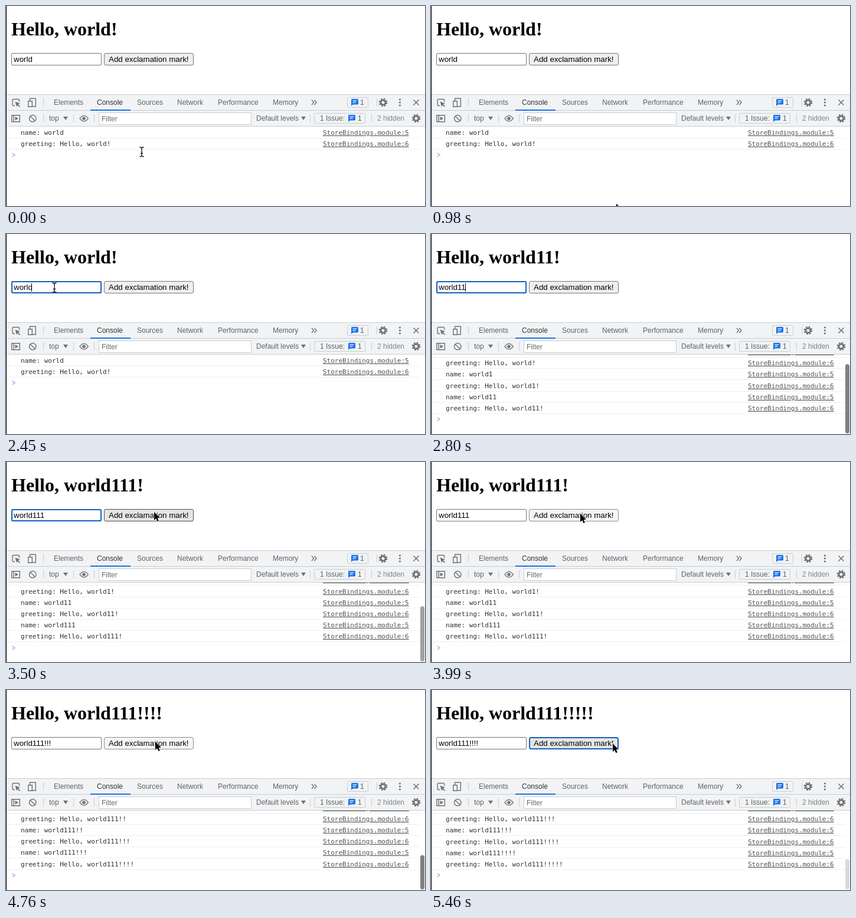
Write an HTML page that moves like this. It is 710 by 340 pixels and loops after 5.53 s.

```html
<!DOCTYPE html>
<html lang="en">
<head>
<meta charset="utf-8">
<title>Store bindings</title>
<style>
  html, body { margin: 0; width: 100%; height: 100%; overflow: hidden; background: #fff; }
  svg { display: block; }
  text { font: 12px "Liberation Sans", Arial, sans-serif; fill: #5f6368; white-space: pre; }
  #heading { font: bold 32px "Liberation Serif", Times, serif; fill: #000; }
  .form { font-size: 13.333px; fill: #000; }
  .log text { font: 11px "DejaVu Sans Mono", Menlo, monospace; fill: #303030; }
  .log .link { fill: #545454; text-decoration: underline; }
  .icon { fill: none; stroke: #6e7175; stroke-width: 1.4; }
  .solid { fill: #6e7175; }
  .rule { fill: none; stroke: #cacdd1; }
</style>
</head>
<body>
<svg width="710" height="340" viewBox="0 0 710 340">
  <defs>
    <clipPath id="pane"><path d="M1 205H710V340H1Z"/></clipPath>
    <g id="gear">
      <circle r="3.9" class="icon" style="stroke-width:2.8"/>
      <circle r="6" class="icon" style="stroke-width:2.6" stroke-dasharray="2.6 2.112"/>
    </g>
    <g id="chat">
      <path d="M1.5 0H10.5Q12 0 12 1.5V8Q12 9.5 10.5 9.5H3L0 12V1.5Q0 0 1.5 0Z" fill="#1a73e8"/>
      <path d="M2.5 3.2H9.5M2.5 6.2H7.5" stroke="#fff" stroke-width="1.3"/>
    </g>
    <path id="down" class="solid" d="M0 0H8L4 6Z"/>
  </defs>

  <text id="heading" x="9" y="50"></text>
  <rect id="field" rx="1.5" fill="#fff"/>
  <text id="value" class="form" x="13" y="95"></text>
  <path id="caret" d="M0 83.5V98" stroke="#000"/>
  <rect id="button" rx="2.5"/>
  <text class="form" x="174" y="95">Add exclamation mark!</text>

  <g clip-path="url(#pane)">
    <g id="log" class="log"></g>
    <path id="prompt" d="M10.5-7L15-4L10.5-1" fill="none" stroke="#8fb4f3" stroke-width="1.5"/>
    <path id="promptCaret" d="M26.5 247V260" stroke="#000"/>
    <rect id="thumb" x="702" width="7" rx="3.5" fill="#808080"/>
  </g>

  <path d="M1 150H710V205H1Z" fill="#f1f3f4"/>
  <path class="rule" d="M1 150.5H710M1 177.5H710M1 204.5H710M63.5 157V171M628.5 157V171M63.5 184V198M114.5 184V198M149.5 184V198M515.5 184V198M619.5 184V198"/>
  <path d="M143 176H211V178H143Z" fill="#1a73e8"/>
  <g id="labels"></g>

  <!-- upper toolbar -->
  <path class="icon" d="M15 169.5H12.5Q11 169.5 11 168V160Q11 158.5 12.5 158.5H21Q22.5 158.5 22.5 160V163"/>
  <path class="solid" d="M15.5 162.5L24 165.7L20.7 167.2L24 170.5L22.7 171.8L19.4 168.5L18 171.5Z"/>
  <path class="icon" d="M40.5 161V157.2H50.3V170.8H45M37.7 161.7H44.3V171.3H37.7Z"/>
  <path class="icon" d="M518 160L521.5 164L518 168M522.5 160L526 164L522.5 168"/>
  <rect class="rule" x="578.5" y="155.5" width="35" height="17" rx="2"/>
  <use href="#chat" x="585" y="158"/>
  <use href="#gear" x="639" y="164"/>
  <g class="solid"><circle cx="667.5" cy="159" r="1.6"/><circle cx="667.5" cy="164" r="1.6"/><circle cx="667.5" cy="169" r="1.6"/></g>
  <path class="icon" d="M690.5 159.5L699.5 168.5M699.5 159.5L690.5 168.5" style="stroke-width:1.6"/>

  <!-- lower toolbar -->
  <path class="icon" d="M9.7 185.7H23.3V196.8H9.7ZM13 185.7V196.8"/>
  <path class="solid" d="M15.5 188L21 191.2L15.5 194.5Z"/>
  <path class="icon" d="M39.5 191.2a5.7 5.7 0 1 0 11.4 0a5.7 5.7 0 1 0-11.4 0M41.2 187.2L49.2 195.2"/>
  <use href="#down" x="97" y="188"/>
  <path class="icon" d="M125 191.2Q132 181.5 139.3 191.2Q132 201 125 191.2Z"/>
  <circle class="solid" cx="132" cy="191.2" r="2.7"/>
  <rect x="157.5" y="181.5" width="258" height="20" fill="#fff" stroke="#cacdd1"/>
  <text x="162" y="196" style="fill:#6b6b6b">Filter</text>
  <use href="#down" x="500" y="188"/>
  <rect class="rule" x="522.5" y="182.5" width="86" height="17" rx="2"/>
  <use href="#chat" x="580" y="185"/>
  <use href="#gear" x="695" y="191"/>

  <path d="M0 0H1V340H0Z"/>
  <path id="arrow" d="M0 0V14L3.2 11.1L5.4 16L7.8 15L5.7 10.1H10Z" stroke="#fff" stroke-width="1.2" paint-order="stroke"/>
  <path id="beam" d="M-3.5-8Q0-8 0-5.5Q0-8 3.5-8M0-6V6M-3.5 8Q0 8 0 5.5Q0 8 3.5 8M-2 2.5H2" fill="none" stroke="#111" stroke-width="1.3"/>
</svg>
<script>
const $ = id => document.getElementById(id);
const set = (el, attrs) => { for (const k in attrs) el.setAttribute(k, attrs[k]); };
const show = (el, on) => { el.style.display = on ? '' : 'none'; };

function add(parent, tag, attrs, text = '') {
  const el = document.createElementNS('http://www.w3.org/2000/svg', tag);
  set(el, attrs);
  el.textContent = text;
  return parent.appendChild(el);
}

const LOOP = 5530, STEP = 70, PITCH = 19.2;
const FOCUS = 2030, BLUR = 3990, RING = 5320;
const EDITS = [2520, 2730, 2940, 4130, 4480, 4690, 4830];
const PRESSES = [[BLUR, 4130], [4340, 4480], [4590, 4690], [4760, 4830]];
const VALUES = [...'111!!!!'].reduce((list, c) => [...list, list.at(-1) + c], ['world']);

// time, x, y
const POINTER = [
  [0, 230, 248], [70, 230, 248], [560, 285, 309], [840, 313, 342], [980, 314, 336],
  [1120, 254, 240], [1400, 160, 125], [1680, 118, 76], [1960, 82, 91],
  [3010, 82, 91], [3290, 250, 85], [3500, 251, 85], [3710, 253, 88],
  [5040, 253, 88], [5390, 308, 91], [LOOP, 308, 91]
];

[[81, 'Elements'], [154, 'Console'], [222, 'Sources'], [290, 'Network'],
 [359, 'Performance'], [452, 'Memory'], [600, '1']]
  .forEach(([x, s]) => add($('labels'), 'text', { x, y: 168, style: s === 'Console' ? 'fill:#333' : '' }, s));
[[73, 'top'], [424, 'Default levels'], [532, '1 Issue:'], [596, '1'], [629, '2 hidden']]
  .forEach(([x, s]) => add($('labels'), 'text', { x, y: 195, style: s === '2 hidden' ? 'fill:#80868b' : '' }, s));

const rows = VALUES.flatMap(v => ['name: ' + v, `greeting: Hello, ${v}!`]).map((s, i) => {
  const y = Math.round(219 + PITCH * i), g = add($('log'), 'g', {});
  add(g, 'text', { x: 25, y }, s);
  add(g, 'text', { x: 537, y, class: 'link' }, 'StoreBindings.module:' + (5 + i % 2));
  add(g, 'path', { d: `M1 ${y + 5.5}H702`, stroke: '#f0f0f0' });
  return g;
});

function pointerAt(t) {
  const i = POINTER.findIndex(p => p[0] > t);
  const [t0, x0, y0] = POINTER[i - 1], [t1, x1, y1] = POINTER[i];
  const k = (t - t0) / (t1 - t0);
  return [x0 + (x1 - x0) * k, y0 + (y1 - y0) * k];
}

function box(el, x, width, ring, fill, stroke) {
  const w = ring ? 2 : 1;
  set(el, { x: x + w / 2, y: 80 + w / 2, width: width - w, height: 21 - w,
    fill, stroke: ring ? '#1460bf' : stroke, 'stroke-width': w });
}

function draw(t) {
  const edits = EDITS.filter(e => e <= t).length;
  const last = edits ? EDITS[edits - 1] : FOCUS;
  const value = VALUES[edits];
  const focused = t >= FOCUS && t < BLUR;
  const [x, y] = pointerAt(t);

  $('heading').textContent = `Hello, ${value}!`;
  $('value').textContent = value;
  box($('field'), 9, 153, focused, '#fff', '#767676');
  show($('caret'), focused && (t - last) % 1000 < 500);
  set($('caret'), { transform: `translate(${Math.floor(13 + 31.85 + 7.41 * edits) - .5} 0)` });

  const hover = x > 166 && x < 318 && y > 80 && y < 101;
  const pressed = PRESSES.some(([a, b]) => t >= a && t < b);
  box($('button'), 166, 152, t >= RING,
    pressed ? '#f5f5f5' : hover ? '#e5e5e5' : '#efefef',
    pressed ? '#8d8d8d' : hover ? '#4f4f4f' : '#767676');

  // console contents stay scrolled to the end
  const count = 2 * edits + 2;
  const scroll = Math.round(Math.max(0, 15 + (count - 6) * PITCH));
  rows.forEach((r, i) => show(r, i < count));
  set($('log'), { transform: `translate(0 ${-scroll})` });
  set($('prompt'), { transform: `translate(0 ${Math.round(219 + PITCH * count) - scroll})` });
  show($('promptCaret'), t >= 1260 && t < 1750);

  const height = 133 * 133 / (PITCH * count + 35);
  set($('thumb'), { y: 339 - height, height,
    opacity: scroll ? Math.max(0, Math.min(1, (675 - (t - last)) / 155)) : 0 });

  const overField = x > 9 && x < 162 && y > 80 && y < 101;
  const beam = overField || y > 205 && y < 300;
  const visible = t < EDITS[0] || t >= 3010;
  for (const [id, on] of [['beam', beam], ['arrow', !beam]]) {
    show($(id), visible && on);
    set($(id), { transform: `translate(${x} ${y})` });
  }
}

const start = performance.now();
function tick() {
  const t = (performance.now() - start) % LOOP;
  draw(Math.floor(t / STEP) * STEP);
  requestAnimationFrame(tick);
}
tick();
</script>
</body>
</html>
```
